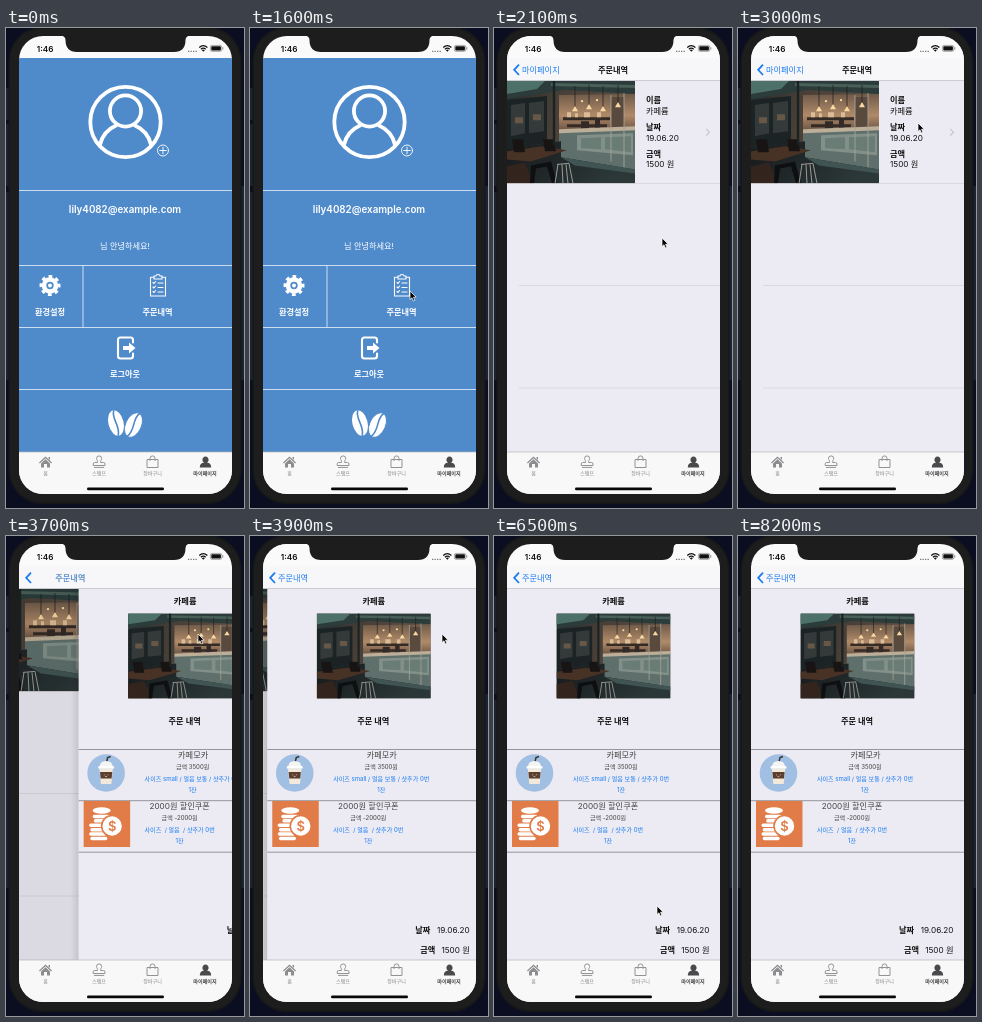
Recreate the animation shown at these times as an HTML page. Size 238x480 px, loop 8.7 s.

```html
<!DOCTYPE html>
<html lang="ko">
<head>
<meta charset="utf-8">
<title>Order history</title>
<style>
  html, body { margin: 0; width: 100%; height: 100%; overflow: hidden; background: #0a0e20; }
  svg { display: block; }
  #stage { width: 238px; height: 480px; }
  text { font: 8.2px Inter, "Noto Sans CJK KR", "Noto Sans CJK JP", "Noto Sans CJK", sans-serif; fill: #111; white-space: pre; }
  .mid { text-anchor: middle; }
  .end { text-anchor: end; }
  .b { font-weight: 600; }
  .w { fill: #fff; }
  .link { fill: #1b7cf2; }
  .s { font-size: 6.05px; }
  .grey { fill: #444; }
  .tab { font-size: 5.1px; fill: #8b8b8d; text-anchor: middle; }
  .line { fill: none; stroke: #fff; stroke-linejoin: round; stroke-linecap: round; }
</style>
</head>
<body>
<svg id="stage" viewBox="0 0 238 480">
  <defs>
    <clipPath id="screen"><rect x="13" y="8" width="213" height="458" rx="24"/></clipPath>
    <linearGradient id="wall" x2="1" y2=".2">
      <stop offset="0" stop-color="#232c2d"/>
      <stop offset=".45" stop-color="#4b4037"/>
      <stop offset="1" stop-color="#5a5048"/>
    </linearGradient>
    <linearGradient id="floor" x2="1" y2=".3">
      <stop offset="0" stop-color="#17191b"/>
      <stop offset="1" stop-color="#2c3838"/>
    </linearGradient>
    <linearGradient id="glow" x2="0" y2="1">
      <stop offset="0" stop-color="#6f5a49"/>
      <stop offset=".6" stop-color="#b08a68"/>
      <stop offset="1" stop-color="#735a47"/>
    </linearGradient>
    <linearGradient id="edge">
      <stop offset="0" stop-color="#000" stop-opacity="0"/>
      <stop offset="1" stop-color="#000" stop-opacity=".1"/>
    </linearGradient>
    <symbol id="cafe" viewBox="0 0 128 102" preserveAspectRatio="none">
      <rect width="128" height="102" fill="url(#wall)"/>
      <path d="M0 0H128V13L58 9L0 18Z" fill="#2b3c3a"/>
      <path d="M0 0H38L30 8L0 13Z" fill="#4d7068"/>
      <path d="M44 2L128 4V7L44 5Z" fill="#486058"/>
      <path d="M0 19L40 15V62L0 68Z" fill="#1c2325"/>
      <path d="M4 24L18 22V52L4 55ZM22 22L37 20V50L22 52Z" fill="#343a3a"/>
      <path d="M8 36H16V42H8ZM26 33H34V39H26Z" fill="#665746"/>
      <path d="M52 14L128 13V46L52 48Z" fill="url(#glow)"/>
      <path d="M56 36H103V39H56ZM60 43H100V46H60Z" fill="#352b26"/>
      <path d="M60 31h4v5h-4zM68 32h3v4h-3zM77 31h6v5h-6zM90 31h4v5h-4z" fill="#d9bd96"/>
      <path d="M74 40h8v8h-8zM88 38h5v10h-5z" fill="#332a27"/>
      <path d="M104 16h13v31h-13z" fill="#5a493d"/>
      <path d="M52 50L128 47V88L52 76Z" fill="#5f706c"/>
      <path d="M52 48L128 45V49L52 52Z" fill="#bcae98"/>
      <path d="M70 54L126 52V74L70 69Z" fill="#829089"/>
      <path d="M74 57L94 56V68L74 67ZM98 56L124 55V71L98 68Z" fill="#6a7c76"/>
      <path d="M0 68L54 60V76L128 88V102H0Z" fill="url(#floor)"/>
      <path d="M54 76L128 88V92L68 84Z" fill="#405553"/>
      <path d="M0 70L34 65L60 69L24 80L0 78Z" fill="#483226"/>
      <path d="M5 58h11l2 13h-11zM36 58h11l2 12h-11z" fill="#171413"/>
      <path d="M0 85L18 81L26 102H0Z" fill="#33241e"/>
      <path d="M24 84L44 80L50 102H45L40 85L29 87L27 102H23Z" fill="#0d0f10"/>
      <path d="M50 83L62 82L66 102M51 83L48 102M55 83L56 102M59 83L61 102" fill="none" stroke="#a9a9a3" stroke-width=".9"/>
      <path d="M47 0V64" stroke="#1a2324" stroke-width="2.4"/>
      <path d="M117 12V86M104 14V80" stroke="#a5a399" stroke-width=".9"/>
      <path d="M68 5V26M82 4V24M96 5V26M111 4V22" stroke="#1f1b18" stroke-width=".7"/>
      <g fill="#f7d9a3">
        <path d="M65 30L68 25L71 30ZM79 28L82 23L85 28ZM93 30L96 25L99 30ZM108 26L111 21L114 26Z"/>
        <circle cx="75" cy="20" r="1.2"/><circle cx="90" cy="19" r="1.2"/>
      </g>
    </symbol>
  </defs>

  <rect width="238" height="480" fill="#0a0e20"/>
  <path d="M0 60H3V92H0ZM0 96H3V158H0ZM0 164H3V352H0ZM235 158H238V352H235Z" fill="#1a2233"/>
  <rect x="2.5" y="-1" width="233" height="477" rx="34" fill="#171818"/>
  <rect x="4" y="1" width="230" height="473" rx="32" fill="#1c1d1c"/>

  <g clip-path="url(#screen)">
    <rect x="13" y="8" width="213" height="458" fill="#fafafa"/>

    <g id="home">
      <rect x="13" y="30" width="213" height="394" fill="#4f8acb"/>
      <path d="M13 162.5H226M13 237.5H226M13 299.5H226M13 361.5H226M77 237.5V299.5" stroke="#dce8f5" stroke-width=".9"/>
      <g class="line" stroke-width="3.8">
        <circle cx="119.5" cy="94" r="35.2"/>
        <circle cx="119.5" cy="83" r="15.6"/>
        <path d="M94 117C96 107 102 101 110 97.5M145 117C143 107 137 101 129 97.5"/>
      </g>
      <g class="line" stroke-width=".9"><circle cx="157" cy="122.5" r="5.5"/><path d="M153.7 122.5H160.3M157 119.2V125.8"/></g>
      <text class="mid b w" x="119" y="185.3" style="font-size:9.8px">lily4082@example.com</text>
      <text class="mid w" x="119" y="221">님 안녕하세요!</text>
      <text class="mid b w" x="44" y="286.6">환경설정</text>
      <text class="mid b w" x="151.5" y="286.6">주문내역</text>
      <text class="mid b w" x="119" y="348.6">로그아웃</text>

      <g transform="translate(44 257.5)">
        <circle r="6" fill="none" stroke="#fff" stroke-width="4.6"/>
        <circle r="9" fill="none" stroke="#fff" stroke-width="3" stroke-dasharray="3.6 3.469" transform="rotate(-11)"/>
        <circle r="1.9" fill="#fff"/>
      </g>

      <g class="line" stroke-width="1.1">
        <path d="M148 249.2H144.5V268H159.5V249.2H156M148 251V248H150C150 246 154 246 154 248H156V251Z"/>
        <path d="M147 254.5l1 1 1.6-2M147 259l1 1 1.6-2M147 263.5l1 1 1.6-2M152 255H157M152 259.5H157M152 264H157"/>
      </g>

      <path class="line" stroke-width="2.1" d="M127 314.5V312Q127 309.5 124.5 309.5H114.5Q112 309.5 112 312V328Q112 330.5 114.5 330.5H124.5Q127 330.5 127 328V325.5"/>
      <path class="w" d="M117 318H123V314.5L129.5 320L123 325.5V322H117Z"/>

      <g transform="translate(110 395) rotate(-14)">
        <ellipse rx="7.6" ry="13" class="w"/>
        <path d="M1 -13C-4 -5 4 3 -1 13" fill="none" stroke="#4f8acb" stroke-width="1.6"/>
      </g>
      <g transform="translate(127.5 397) rotate(24)">
        <ellipse rx="8" ry="13" class="w" stroke="#4f8acb"/>
        <path d="M1 -13C-4 -5 4 3 -1 13" fill="none" stroke="#4f8acb" stroke-width="1.6"/>
      </g>
      <rect id="homeDim" x="13" y="8" width="300" height="416" opacity="0"/>
    </g>

    <g id="list">
      <rect x="5" y="30" width="8" height="394" fill="url(#edge)"/>
      <rect x="13" y="8" width="213" height="22" fill="#fafafa"/>
      <rect x="13" y="52" width="213" height="372" fill="#ecebf3"/>
      <rect id="cell" x="13" y="53" width="213" height="102" fill="#d6d5da"/>
      <use href="#cafe" x="13" y="53" width="128" height="102.5"/>
      <path d="M13 155.5H226M25 257.5H226M25 360H226" stroke="#d6d5db" stroke-width=".8"/>
      <text class="b" x="152" y="75">이름</text><text x="152" y="85.8">카페륨</text>
      <text class="b" x="152" y="102">날짜</text><text x="152" y="112.8">19.06.20</text>
      <text class="b" x="152" y="128.5">금액</text><text x="152" y="139.2">1500 원</text>
      <path d="M212.3 100.8L215.4 104.2L212.3 107.6" fill="none" stroke="#c4c3ca" stroke-width="1.1"/>
      <rect id="listDim" x="13" y="52" width="213" height="372" opacity="0"/>
    </g>

    <g id="detail">
      <rect x="5" y="52" width="8" height="372" fill="url(#edge)"/>
      <rect x="13" y="52" width="213" height="372" fill="#ecebf3"/>
      <text class="mid b" x="119.5" y="67.6">카페륨</text>
      <use href="#cafe" x="62.5" y="77.5" width="114" height="85"/>
      <text class="mid b" x="119" y="188">주문 내역</text>
      <path d="M13 213.5H226M13 264.7H226M13 316.2H226" stroke="#96959b"/>

      <circle cx="40.5" cy="237" r="18.8" fill="#a0bfe2"/>
      <path d="M40.5 228L42 221.5L45 220.5" fill="none" stroke="#3a3330" stroke-width="1.5"/>
      <path d="M34 231Q34 225 40.5 225Q47 225 47 231Z" fill="#f4f4f2"/>
      <rect x="32.5" y="230" width="16" height="2.8" rx="1.2" fill="#fff"/>
      <path d="M33.8 232.8H47.2L45.7 248H35.3Z" fill="#f3e9db"/>
      <path d="M34.4 236H46.6L46 242.5H35Z" fill="#5c3d2e"/>
      <path d="M38.2 238.8h.8M42 238.8h.8M39.4 240.2q1 .9 2 0" stroke="#f3eee5" stroke-width=".7" fill="none"/>

      <g class="mid">
        <text class="grey" x="127.5" y="222">카페모카</text>
        <text class="s grey" x="127" y="233.2">금액 3500원</text>
        <text class="s link" x="127" y="245.2">사이즈 small / 얼음 보통 / 샷추가 0번</text>
        <text class="s link" x="127" y="256.2">1잔</text>
        <text class="grey" x="114" y="273">2000원 할인쿠폰</text>
        <text class="s grey" x="114" y="284.3">금액 -2000원</text>
        <text class="s link" x="114" y="296.2">사이즈  / 얼음  / 샷추가 0번</text>
        <text class="s link" x="114" y="307.3">1잔</text>
      </g>

      <rect x="18" y="265" width="46.5" height="46" fill="#e17c48"/>
      <g id="coins" class="w"></g>
      <circle cx="46.5" cy="290" r="10.5" class="w" stroke="#e17c48" stroke-width="1.6"/>
      <text class="mid b" x="46.5" y="294.8" style="font-size:13px;fill:#e17c48">$</text>

      <text class="b" x="161" y="396.8">날짜</text><text class="end" x="215.5" y="396.8">19.06.20</text>
      <text class="b" x="166" y="416.8">금액</text><text class="end" x="215.5" y="416.8">1500 원</text>
    </g>

    <g id="nav">
      <rect x="13" y="30" width="213" height="22.5" fill="#f7f7f9"/>
      <path d="M13 52.5H226" stroke="#bdbcc2" stroke-width=".7"/>
      <path d="M25 36.6L20.2 41.8L25 47" fill="none" stroke="#1b7cf2" stroke-width="1.8"/>
      <g id="listNav">
        <text class="link" x="28" y="44.8">마이페이지</text>
        <text class="mid b" x="119" y="44.8">주문내역</text>
      </g>
      <text id="detailNav" class="link" x="28" y="44.8">주문내역</text>
    </g>

    <rect x="13" y="424" width="213" height="42" fill="#f8f8f9"/>
    <path d="M13 424H226" stroke="#b7b6bb" stroke-width=".7"/>
    <path d="M33 434.6L39.5 428.4L46 434.6L45.2 435.5L39.5 430.2L33.8 435.5ZM35 435.5L39.5 431.3L44 435.5V439.5H41V436H38V439.5H35ZM42.5 429H44V432L42.5 430.5Z" fill="#8d8d90"/>
    <g fill="none" stroke="#939396" stroke-width="1">
      <path d="M91.5 434.5C92 432.5 90.5 432 90.5 430.5A2.6 2.6 0 0 1 95.7 430.5C95.7 432 94.2 432.5 94.7 434.5H97.5Q99 434.5 99 436V437.5H87.2V436Q87.2 434.5 88.7 434.5ZM88 439.4H98.2"/>
      <path d="M141 431.5H152V439.5H141ZM144 433V430.5A2.5 2.6 0 0 1 149 430.5V433"/>
    </g>
    <path d="M193.8 439.5Q193.8 435 198 434.8A3.1 3.3 0 1 1 201 434.8Q205.2 435 205.2 439.5Z" fill="#4a4a4c"/>
    <text class="tab" x="39.5" y="447.2">홈</text>
    <text class="tab" x="93" y="447.2">스탬프</text>
    <text class="tab" x="146.5" y="447.2">장바구니</text>
    <text class="tab b" x="199" y="447.2" style="fill:#3f3f41">마이페이지</text>
    <rect x="81" y="459.6" width="77" height="2.6" rx="1.3" fill="#080808"/>

    <text class="b" x="30.8" y="24">1:46</text>
    <path d="M182 23.3H191" stroke="#777" stroke-width="1.2" stroke-dasharray="1.3 1.2"/>
    <path d="M193.2 19.4Q197.3 15.9 201.4 19.4M194.9 21.2Q197.3 19.1 199.7 21.2" fill="none" stroke="#111" stroke-width="1.3"/>
    <path d="M195.8 22.2Q197.3 21 198.8 22.2L197.3 23.8Z" fill="#111"/>
    <rect x="204.4" y="17.4" width="11.4" height="6" rx="1.6" fill="none" stroke="#777" stroke-width=".6"/>
    <rect x="205.3" y="18.3" width="9.6" height="4.2" rx=".8" fill="#111"/>
    <path d="M216.8 19.3V21.5" stroke="#777" stroke-width=".8"/>
  </g>

  <path d="M55.5 7.5H183.5Q179.5 8.5 179.5 12Q179.5 24 168 24H71Q59.5 24 59.5 12Q59.5 8.5 55.5 7.5Z" fill="#1c1d1c"/>
  <path id="cursor" d="M0 0V8.6L2 6.8L3.4 10L4.9 9.3L3.5 6.2H6.2Z" fill="#050505" stroke="#fff" stroke-width=".7" stroke-linejoin="round"/>
</svg>

<script>
  const LOOP = 8700, STEP = 100, WIDTH = 213;
  const $ = id => document.getElementById(id);

  // time, then values; linear in between
  const pointer = [
    [1000, 196, 318], [1500, 160, 263], [1900, 160, 263], [2500, 184, 104],
    [3000, 180, 95], [3400, 192, 98], [4400, 192, 98], [4800, 176, 250],
    [5000, 160, 330], [5200, 150, 307], [6100, 150, 307], [6500, 163, 370],
    [6800, 163, 370], [7300, 207, 434], [7600, 199, 421], [8100, 199, 421]
  ];
  const listPush = [[1600, 1], [1700, .36], [1800, .07], [1900, .015], [2000, 0]];
  const detailPush = [[3500, 1], [3600, .74], [3700, .28], [3800, .07], [3900, .02], [4000, 0]];

  function sample(keys, t) {
    if (t <= keys[0][0]) return keys[0].slice(1);
    const i = keys.findIndex(k => k[0] > t);
    if (i < 0) return keys[keys.length - 1].slice(1);
    const a = keys[i - 1], b = keys[i], p = (t - a[0]) / (b[0] - a[0]);
    return a.slice(1).map((v, n) => v + (b[n + 1] - v) * p);
  }

  const shift = (id, x, y = 0) => $(id).setAttribute("transform", `translate(${x} ${y})`);
  const fade = (id, v) => $(id).setAttribute("opacity", v);
  const show = (id, on) => $(id).style.display = on ? "" : "none";

  function stack(x, y, count) {
    let out = "";
    for (let i = 0; i < count; i++)
      out += `<rect x="${x + (i % 2) * 1.2}" y="${y + i * 4.4}" width="17" height="3.5" rx="1.7"/>`;
    return out;
  }
  $("coins").innerHTML = '<ellipse cx="36" cy="274.5" rx="9" ry="3.2"/>' + stack(27, 278.7, 2) + stack(23.5, 287.5, 4);

  function draw(t) {
    const [r1] = sample(listPush, t), [r2] = sample(detailPush, t);

    show("home", r1 > 0);
    shift("home", -.3 * WIDTH * (1 - r1));
    fade("homeDim", .1 * (1 - r1));

    show("list", r1 < 1 && r2 > 0);
    shift("list", WIDTH * r1 - .3 * WIDTH * (1 - r2));
    fade("listDim", .1 * (1 - r2));
    show("cell", t >= 3500);

    show("detail", r2 < 1);
    shift("detail", WIDTH * r2);

    show("nav", r1 < 1);
    shift("nav", WIDTH * r1);
    shift("listNav", -76 * (1 - r2));
    fade("listNav", r2 < .1 ? 0 : r2);
    shift("detailNav", r2 < .1 ? 0 : 76 * r2);
    fade("detailNav", 1 - r2);

    show("cursor", t >= 1000 && t < 8200);
    shift("cursor", ...sample(pointer, t));
  }

  const start = performance.now();
  function tick() {
    const t = (performance.now() - start) % LOOP;
    draw(Math.floor(t / STEP) * STEP);
    requestAnimationFrame(tick);
  }
  tick();
</script>
</body>
</html>
```
